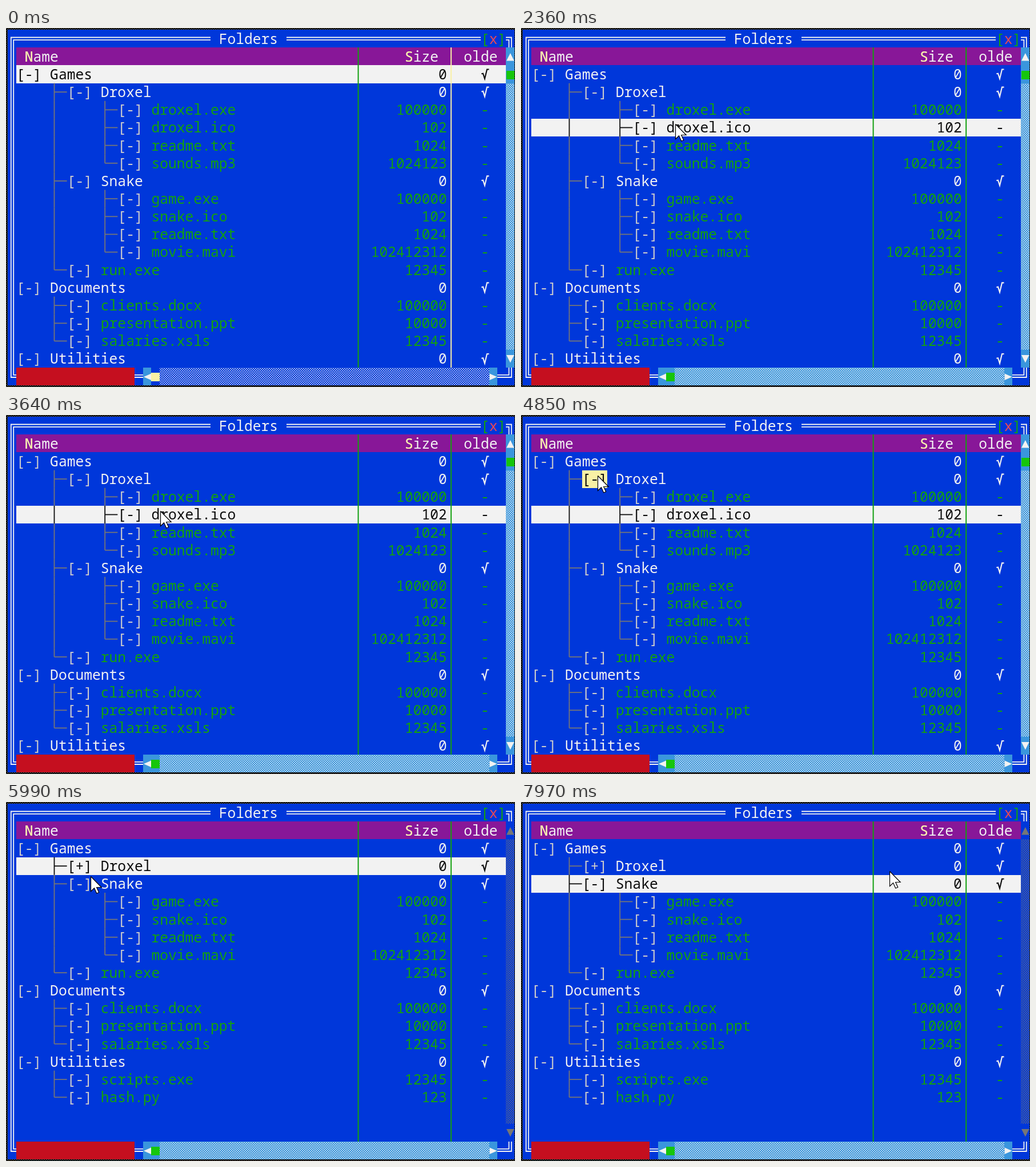
An HTML page with a canvas for the animation above (8000 ms loop, 891 by 629 pixels).

```html
<!DOCTYPE html>
<html lang="en">
<head>
<meta charset="utf-8">
<title>Folders</title>
<style>
html, body { margin: 0; width: 100%; height: 100%; overflow: hidden; background: #0037da; }
canvas { display: block; width: 891px; height: 629px; }
</style>
</head>
<body>
<canvas id="stage" width="891" height="629"></canvas>
<script>
const ctx = document.getElementById('stage').getContext('2d');
const LOOP = 8000, CW = 14.78, RH = 31.16, VISIBLE = 17;
const BLUE = '#0037da', SKY = '#3a96dd', WHITE = '#f2f2f2', SILVER = '#cccccc', GREY = '#767676';
const GREEN = '#13a10e', LIME = '#16c60c', YELLOW = '#f9f1a5', BLACK = '#0c0c0c';

// Left edge of a column and top edge of a row; row 0 is the table header
const cx = c => 18 + c * CW;
const ry = r => 34.3 + r * RH;

// depth, name, size, folder
const items = [
  [0, 'Games', 0, true],
  [1, 'Droxel', 0, true],
  [2, 'droxel.exe', 100000],
  [2, 'droxel.ico', 102],
  [2, 'readme.txt', 1024],
  [2, 'sounds.mp3', 1024123],
  [1, 'Snake', 0, true],
  [2, 'game.exe', 100000],
  [2, 'snake.ico', 102],
  [2, 'readme.txt', 1024],
  [2, 'movie.mavi', 102412312],
  [1, 'run.exe', 12345],
  [0, 'Documents', 0, true],
  [1, 'clients.docx', 100000],
  [1, 'presentation.ppt', 10000],
  [1, 'salaries.xsls', 12345],
  [0, 'Utilities', 0, true],
  [1, 'scripts.exe', 12345],
  [1, 'hash.py', 123]
].map(([depth, name, size, folder]) => ({ depth, name, size, folder }));

// Pointer moves: start, end, number of steps, target
const entry = [561, 482];
const moves = [
  [200, 200, 1, 561, 482],
  [268, 610, 6, 244, 145],
  [750, 1030, 5, 270, 168],
  [4240, 4850, 10, 134, 106],
  [5184, 5332, 3, 617, 200],
  [5406, 5480, 2, 701, 215],
  [5554, 5850, 5, 176, 146],
  [5920, 5987, 2, 148, 130],
  [6053, 6120, 2, 132, 118],
  [6260, 6450, 4, 131, 138],
  [7570, 7970, 7, 645, 121]
];
const clicks = [[1430, 1700], [2100, 2300], [4980, 5110], [6650, 6780], [7240, 7370]];

const ease = k => k * k * k * (k * (6 * k - 15) + 10);

function pointer(t) {
  let [x, y] = entry, moved = 0;
  for (const [t0, t1, n, tx, ty] of moves) {
    if (t < t0) break;
    const gap = n > 1 ? (t1 - t0) / (n - 1) : 1;
    const step = Math.min(n, Math.floor((t - t0) / gap + 0.001) + 1);
    const k = ease(step / n);
    x += (tx - x) * k;
    y += (ty - y) * k;
    moved = t0;
    if (step < n) break;
  }
  return { x, y, moved };
}

function stateAt(t) {
  const p = pointer(t);
  const clicked = clicks.reduce((last, c) => t >= c[0] ? c[0] : last, 0);
  const droxelShut = t >= 4980, snakeShut = t >= 6650 && t < 7240;
  return {
    p,
    shown: t >= 200,
    live: p.moved > clicked,
    pressed: clicks.some(c => t >= c[0] && t < c[1]),
    selected: items[t < 2100 ? 0 : t < 4980 ? 3 : t < 6650 ? 1 : 6],
    shut: new Set([droxelShut && items[1], snakeShut && items[6]]),
    scroll: t >= 3240 && t < 3640 ? 1 : 0,
    barHot: t < 2100,
    edgeHot: t < 2300
  };
}

function visibleItems(shut) {
  let hide = Infinity;
  return items.filter(it => {
    if (it.depth > hide) return false;
    hide = shut.has(it) ? it.depth : Infinity;
    return true;
  });
}

function shade(bg, dot) {
  const tile = document.createElement('canvas');
  tile.width = tile.height = 4;
  const g = tile.getContext('2d');
  g.fillStyle = bg;
  g.fillRect(0, 0, 4, 4);
  g.fillStyle = dot;
  g.fillRect(0, 0, 2, 1.2);
  g.fillRect(2, 2, 2, 1.2);
  return ctx.createPattern(tile, 'repeat');
}
const trackOn = shade(SKY, WHITE), trackHot = shade(BLUE, WHITE);
const trackOff = shade(BLUE, GREY), desktop = shade(BLACK, '#4c4c4c');

function box(x0, y0, x1, y1, color) {
  x0 = Math.round(x0);
  y0 = Math.round(y0);
  ctx.fillStyle = color;
  ctx.fillRect(x0, y0, Math.round(x1) - x0, Math.round(y1) - y0);
}

function text(s, col, row, color) {
  ctx.fillStyle = color;
  ctx.fillText(s, cx(col), ry(row) + 24.4);
}

function path(points, color, width) {
  ctx.beginPath();
  points.forEach(([x, y]) => ctx.lineTo(x, y));
  ctx.strokeStyle = color;
  ctx.lineWidth = width;
  ctx.stroke();
}

function poly(points, color) {
  ctx.beginPath();
  points.forEach(([x, y]) => ctx.lineTo(x, y));
  ctx.closePath();
  ctx.fillStyle = color;
  ctx.fill();
}

function drawFrame() {
  box(0, 0, 891, 629, desktop);
  box(3, 3, 890, 626, BLUE);
  const line = pts => path(pts, WHITE, 1.8);
  line([[358, 16.5], [8.8, 16.5], [8.8, 612], [240, 612]]);
  line([[358, 20.8], [13.2, 20.8], [13.2, 607.8], [240, 607.8]]);
  line([[491, 16.5], [831, 16.5]]);
  line([[491, 20.8], [831, 20.8]]);
  line([[875, 16.5], [884.8, 16.5], [884.8, 34]]);
  line([[875, 20.8], [880.4, 20.8], [880.4, 34]]);
  line([[860, 612], [884.8, 612], [884.8, 595]]);
  line([[860, 607.8], [880.4, 607.8], [880.4, 595]]);
  text('Folders', 24, -1, WHITE);
  text('[', 55, -1, GREEN);
  text('x', 56, -1, '#e74856');
  text(']', 57, -1, GREEN);
  box(18, 595, 225, 626, '#c50f1f');
}

function drawHeader() {
  box(18, 34, cx(58), ry(1), '#881798');
  text('Name', 1, 0, WHITE);
  text('N', 1, 0, YELLOW);
  text('Size', 46, 0, WHITE);
  text('S', 46, 0, YELLOW);
  text('olde', 53, 0, WHITE);
}

function drawTree(list, i, row, color) {
  const top = ry(row), mid = top + RH / 2, { depth } = list[i];
  for (let d = 1; d <= depth; d++) {
    const x = cx(6 * d - 2) + CW / 2;
    const next = list.slice(i + 1).find(it => it.depth <= d);
    const goesOn = next && next.depth === d;
    if (d === depth) path([[x, mid], [cx(6 * d), mid]], color, 1.8);
    if (goesOn || d === depth) path([[x, top], [x, goesOn ? top + RH : mid]], color, 1.8);
  }
}

function drawRow(s, list, i) {
  const it = list[i], row = i - s.scroll + 1, top = ry(row);
  const picked = it === s.selected;
  const main = picked ? BLACK : it.folder ? WHITE : GREEN;
  if (picked) box(18, top, cx(58), top + RH, WHITE);
  drawTree(list, i, row, picked ? BLACK : GREY);

  const col = 6 * it.depth, { x, y } = s.p;
  const hot = s.shown && s.live && y >= top && y < top + RH && x >= cx(col) && x < cx(col + 3) - 6;
  if (hot) box(cx(col), top, cx(col + 3), top + RH, YELLOW);
  text(s.shut.has(it) ? '[+]' : '[-]', col, row, picked || hot ? BLACK : SILVER);
  text(it.name, col + 4, row, main);

  const size = String(it.size);
  text(size, 51 - size.length, row, main);
  if (it.folder) {
    path([[832.3, top + 14.8], [835, top + 14.2], [838, top + 23.5], [842, top + 7], [845.5, top + 7]], main, 2.1);
  } else {
    text('-', 55, row, main);
  }
}

function drawColumns(s) {
  const edge = (col, hot) => path([[cx(col), 34], [cx(col), 595]], hot ? YELLOW : GREEN, 2);
  edge(40.5, s.shown && Math.abs(s.p.x - 617) < 26);
  edge(51.5, s.edgeHot);
}

function drawVertical(active, scroll, extra) {
  const x0 = cx(58), x1 = 890;
  box(x0, 34, x1, 595, active ? SKY : BLUE);
  box(x0, ry(1), x1, ry(17), active ? trackOn : trackOff);
  const color = active ? WHITE : GREY;
  poly([[876, 57.5], [882.8, 44], [889.6, 57.5]], color);
  poly([[876, 573], [882.8, 586.5], [889.6, 573]], color);
  if (!active) return;
  const top = ry(1 + Math.round(scroll / extra * 15));
  box(x0, top, x1, top + RH, SKY);
  box(x0 + 1, top + 10, x1, top + 24.5, LIME);
}

function drawHorizontal(hot) {
  box(cx(15), 595, cx(57), 626, SKY);
  box(cx(16), 595, cx(56), 626, hot ? trackHot : trackOn);
  box(cx(16), 595, cx(17), 626, hot ? BLUE : SKY);
  box(cx(16), 604, cx(17), 619, hot ? YELLOW : LIME);
  poly([[254, 605.5], [241, 611.3], [254, 617]], WHITE);
  poly([[846.5, 605.5], [859.5, 611.3], [846.5, 617]], WHITE);
}

function drawPointer({ x, y }, pressed) {
  if (pressed) {
    ctx.beginPath();
    ctx.arc(x, y + 0.5, 23, 0, 7);
    ctx.fillStyle = 'rgba(255,240,0,.65)';
    ctx.fill();
  }
  const arrow = [[0, 0], [0, 26], [6, 20.3], [10.2, 29.6], [14.2, 28], [10.2, 19], [18.6, 19]]
    .map(([dx, dy]) => [x + dx + 0.5, y + dy + 0.5]);
  poly(arrow, '#fff');
  path([...arrow, arrow[0]], '#000', 1.2);
}

function draw(t) {
  const s = stateAt(t), list = visibleItems(s.shut);
  ctx.font = '24.63px "Noto Sans Mono", "DejaVu Sans Mono", monospace';
  drawFrame();
  drawHeader();
  const end = Math.min(list.length, s.scroll + VISIBLE);
  for (let i = s.scroll; i < end; i++) drawRow(s, list, i);
  drawColumns(s);
  drawVertical(list.length > VISIBLE, s.scroll, list.length - VISIBLE);
  drawHorizontal(s.barHot);
  if (s.shown) drawPointer(s.p, s.pressed);
}

const start = performance.now();
function tick() {
  draw((performance.now() - start) % LOOP);
  requestAnimationFrame(tick);
}
tick();
</script>
</body>
</html>
```
